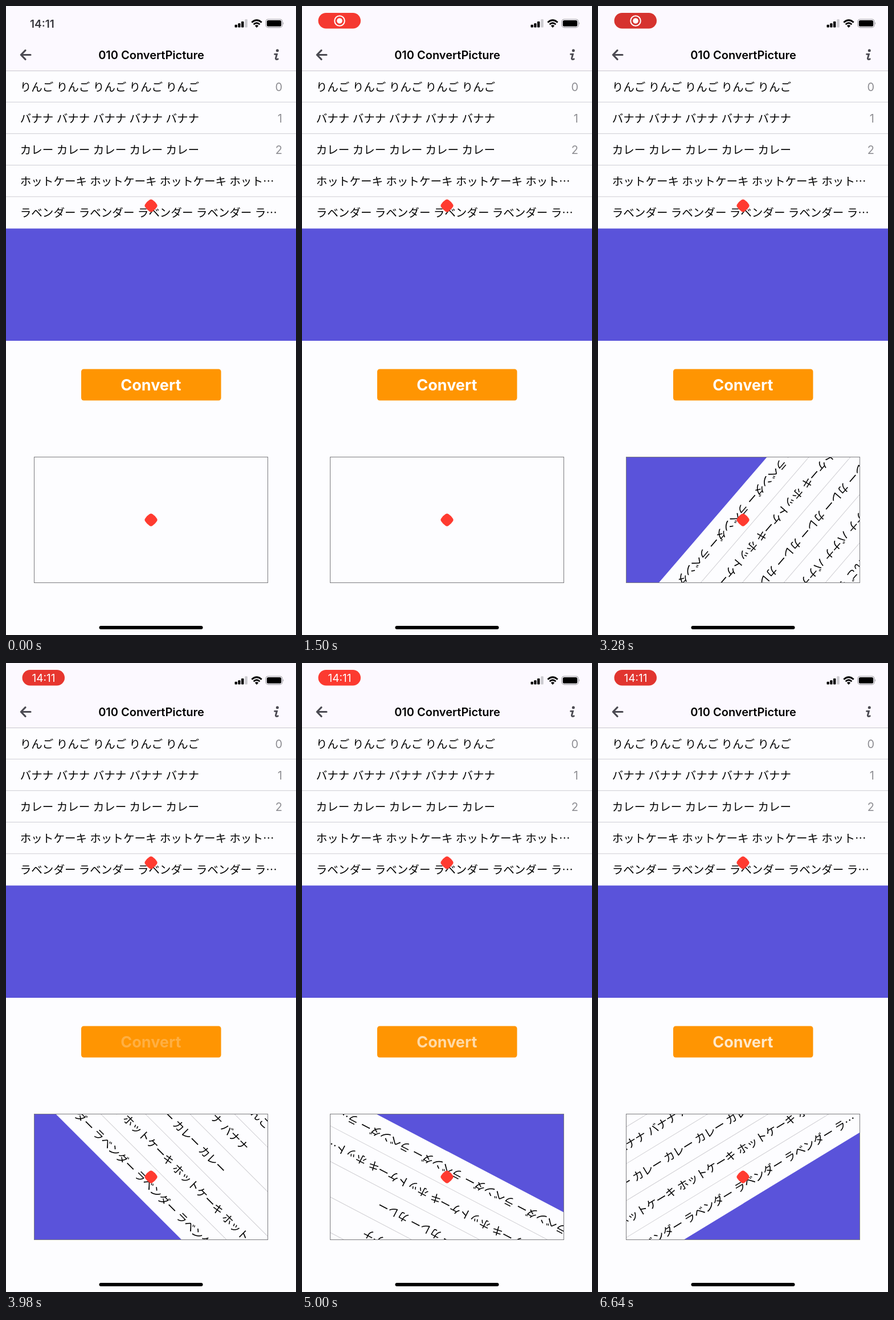
Animation of 509x1101 px, one loop 6740 ms. Source, as an HTML page:

```html
<!DOCTYPE html>
<html lang="ja">
<head>
<meta charset="utf-8">
<title>ConvertPicture</title>
<style>
  html, body { margin: 0; width: 100%; height: 100%; overflow: hidden; background: #fdfdff; }
  svg { display: block; width: 100vw; height: 100vh; }
  text { font-family: Inter, "Noto Sans CJK JP", "Noto Sans CJK", sans-serif; }
  .item { font: 350 19.55px "Noto Sans CJK JP", "Noto Sans CJK", sans-serif; word-spacing: .95px; }
  .count { font-size: 20px; fill: #8e8e93; text-anchor: end; }
  .mid { text-anchor: middle; }
</style>
</head>
<body>
<svg viewBox="0 0 509 1101" xmlns="http://www.w3.org/2000/svg">
  <defs>
    <clipPath id="frame"><rect x="50" y="790" width="409" height="219"/></clipPath>
    <path id="marker" fill="#ff3b30" d="M-2.5-10.2Q0-12 2.5-10.2Q7.2-7.2 10.2-2.5Q12 0 10.2 2.5Q7.2 7.2 2.5 10.2Q0 12-2.5 10.2Q-7.2 7.2-10.2 2.5Q-12 0-10.2-2.5Q-7.2-7.2-2.5-10.2Z"/>
  </defs>

  <rect width="509" height="1101" fill="#fdfdff"/>
  <rect width="509" height="113" fill="#fcf9ff"/>
  <rect y="113" width="509" height="1" fill="#c9c8cd"/>

  <!-- status bar -->
  <text id="clock" x="63.5" y="38" class="mid" font-size="19" font-weight="600" fill="#38383d">14:11</text>
  <g id="pill">
    <rect id="pillShape" x="28.5" y="12" width="74.5" height="27.6" rx="13.8"/>
    <g id="record">
      <circle cx="66" cy="26" r="8.8" fill="none" stroke="#fff" stroke-width="2"/>
      <circle cx="66" cy="26" r="4.8" fill="#fff"/>
    </g>
    <text id="pillClock" x="66" y="33" class="mid" font-size="19" fill="#fff">14:11</text>
  </g>
  <rect x="401.5" y="32.8" width="4.4" height="4.8" rx="1"/>
  <rect x="407.2" y="30.3" width="4.4" height="7.3" rx="1"/>
  <rect x="413" y="27" width="4.4" height="10.6" rx="1"/>
  <rect x="419.3" y="23.3" width="4.4" height="14.3" rx="1" fill="#cbcacf"/>
  <g fill="none" stroke="#000" stroke-width="2.8">
    <path d="M431.3 28.7Q440 20.8 448.7 28.7"/>
    <path d="M434.6 32.2Q440 27.4 445.4 32.2"/>
  </g>
  <path d="M436.8 34.6Q440 32 443.2 34.6L440 37.9Z"/>
  <rect x="456" y="23.2" width="29" height="14.4" rx="4.2" fill="none" stroke="#99989d" stroke-width="1.1"/>
  <rect x="457.8" y="25" width="25.4" height="10.8" rx="2.6"/>
  <path d="M486.3 28q2 2.3 0 4.8Z" fill="#99989d"/>

  <!-- navigation bar -->
  <path d="M43 85.5H27M34 77.7L26.3 85.5L34 93.3" fill="none" stroke="#4b4a52" stroke-width="3.2" stroke-linecap="round" stroke-linejoin="round"/>
  <text x="255" y="93" class="mid" font-size="20" font-weight="600">010 ConvertPicture</text>
  <circle cx="476.3" cy="78" r="2.5" fill="#4b4a52"/>
  <path d="M471.6 84.4H475.4L473.4 91.5Q472.9 94.5 477.2 92.8" fill="none" stroke="#4b4a52" stroke-width="2.9" stroke-linecap="round"/>

  <g id="list"></g>
  <use href="#marker" x="254.5" y="349.5"/>

  <rect x="132" y="635.5" width="245.5" height="55" rx="4.5" fill="#ff9502"/>
  <text id="label" x="254.3" y="673" class="mid" font-size="27" font-weight="700" fill="#fff">Convert</text>

  <g clip-path="url(#frame)"><use id="shot" href="#list"/></g>
  <rect x="49.5" y="789.5" width="410" height="220" fill="none" stroke="#7b7b7e"/>
  <use href="#marker" x="254.5" y="899.5"/>
  <rect x="163.5" y="1085" width="182" height="6" rx="3"/>
</svg>

<script>
const LOOP = 6740;
const $ = id => document.getElementById(id);
const clamp = v => Math.min(1, Math.max(0, v));
const ramp = (t, from, length) => clamp((t - from) / length);

const items = [
  Array(5).fill('りんご').join(' '),
  Array(5).fill('バナナ').join(' '),
  Array(5).fill('カレー').join(' '),
  'ホットケーキ '.repeat(3) + 'ホット…',
  'ラベンダー '.repeat(4) + 'ラ…'
];
const ROW = 55.2;
$('list').innerHTML = '<rect y="389.5" width="509" height="196.5" fill="#5a53da"/>' +
  items.map((item, i) => {
    const y = 148.5 + i * ROW;
    const count = i < 3 ? `<text class="count" x="485" y="${y}">${i}</text>` : '';
    const line = i < 4 ? `<rect y="${167.7 + i * ROW}" width="509" height="1" fill="#cfced3"/>` : '';
    return `<text class="item" x="24.8" y="${y}">${item}</text>${count}${line}`;
  }).join('');

// Each tap turns the captured list to a new angle; its label fades back after release.
const taps = [
  { at: 1680, release: 1680, angle: 130.8 },
  { at: 3940, release: 3950, angle: 44.9 },
  { at: 4740, release: 4736, angle: 207.6 },
  { at: 5560, release: 5595, angle: 26.3 },
  { at: 6360, release: 6290, angle: -31.3 }
];
const PRESS = 120, RECOVER = 470;

function labelAlpha(t) {
  const tap = taps.findLast(tap => t >= tap.release - PRESS);
  if (!tap) return 1;
  return t < tap.release
    ? 1 - .8 * ramp(t, tap.release - PRESS, 80)
    : .2 + .8 * ramp(t, tap.release, RECOVER);
}

function pillColor(t) {
  const glow = .5 + .5 * Math.cos((t - 4750) / 2800 * 2 * Math.PI);
  const mix = (dark, bright) => Math.round(dark + (bright - dark) * glow);
  return `rgb(${mix(214, 255)},${mix(51, 59)},${mix(46, 48)})`;
}

function draw(t) {
  const shown = ramp(t, 700, 220);
  const swapped = ramp(t, 3300, 240);
  $('clock').style.opacity = 1 - shown;
  $('pill').style.opacity = shown;
  $('pillShape').setAttribute('fill', pillColor(t));
  $('record').style.opacity = 1 - swapped;
  $('pillClock').style.opacity = swapped;
  $('label').style.opacity = labelAlpha(t);

  const tap = taps.findLast(tap => t >= tap.at);
  $('shot').style.visibility = tap ? 'visible' : 'hidden';
  if (tap) {
    $('shot').setAttribute('transform',
      `translate(254.5 899.5) rotate(${tap.angle}) translate(-254.5 -349.5)`);
  }
}

const start = performance.now();
function tick() {
  draw((performance.now() - start) % LOOP);
  requestAnimationFrame(tick);
}
tick();
</script>
</body>
</html>
```
